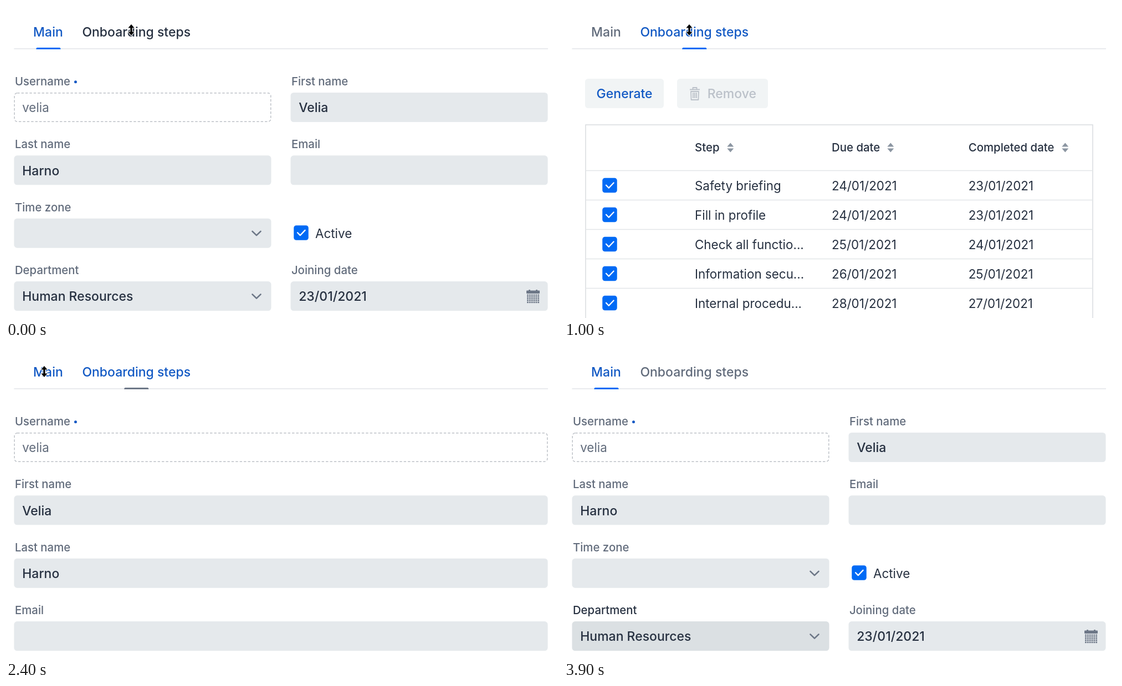
Animation of 996x562 px, one loop 4 s. Source, as an HTML page:

```html
<!DOCTYPE html>
<html lang="en">
<head>
<meta charset="utf-8">
<title>Onboarding form</title>
<style>
  :root {
    --blue: #006af5; --link: #1259c4; --ink: #263040; --muted: #616b7b;
    --icon: #6d7787; --field: #e5e9ec; --shade: #dbe0e3; --off: #bbc1c9;
  }
  html, body { margin: 0; width: 100%; height: 100%; overflow: hidden; background: #fff; }
  svg { display: block; width: 996px; height: 562px; }
  text { font-family: Inter, Roboto, sans-serif; font-size: 22.4px; fill: var(--ink); white-space: pre; }
  .medium { font-size: 23px; font-weight: 500; }
  .label { font-size: 20.4px; font-weight: 500; fill: var(--muted); }
  .head { font-size: 20.4px; font-weight: 500; }
  .readonly { fill: var(--muted); }
  .link { fill: var(--link); }
  .off { fill: var(--off); }
  .box { fill: var(--field); }
  .dashed { fill: #fff; stroke: #bdc1c7; stroke-width: 1.5; stroke-dasharray: 4.4 3; }
  .button { fill: #f1f4f5; }
  .line { fill: none; stroke: #e2e5e8; stroke-width: 1.5; }
  .bar, .halo { fill: var(--blue); transform-box: fill-box; transform-origin: center; }

  /* One frame is 2.5% of the loop; the small lead keeps samples off the edges. */
  .anim { animation: 4s step-end -10ms infinite; }
  #two { animation-name: two; }
  #grid { animation-name: grid; }
  #one { animation-name: one; }
  #mainTab { animation-name: main-tab; }
  #stepsTab { animation-name: steps-tab; }
  #mainBar { animation-name: main-bar; }
  #stepsBar { animation-name: steps-bar; }
  #mainHalo { animation-name: main-halo; }
  #stepsHalo { animation-name: steps-halo; }
  #firstClick { animation-name: first-click; }
  #secondClick { animation-name: second-click; }
  #cursor { animation-name: cursor; }
  .hover .box { animation: hover-box 4s step-end var(--at) infinite; }
  .hover .label { animation: hover-label 4s step-end var(--at) infinite; }

  @keyframes two { 0%, 62.5% { visibility: visible } 7.5% { visibility: hidden } }
  @keyframes grid { 0%, 60% { visibility: hidden } 7.5% { visibility: visible } }
  @keyframes one { 0%, 62.5% { visibility: hidden } 60% { visibility: visible } }
  @keyframes main-tab {
    0%, 57.5% { fill: var(--link) } 10% { fill: var(--muted) } 42.5% { fill: var(--ink) }
  }
  @keyframes steps-tab {
    0% { fill: var(--ink) } 5% { fill: var(--link) } 62.5%, 100% { fill: var(--muted) }
  }
  @keyframes main-bar {
    0%, 62.5%, 100% { fill: var(--blue); transform: none }
    7.5% { fill: var(--icon); transform: none }
    10% { fill: var(--icon); transform: scaleX(.15) }
    12.5% { fill: var(--icon); transform: scaleX(0) }
  }
  @keyframes steps-bar {
    0%, 65%, 100% { fill: var(--icon); transform: scaleX(0) }
    10% { fill: var(--blue); transform: scaleX(1.1) }
    12.5% { fill: var(--blue); transform: none }
    60% { fill: var(--icon); transform: none }
    62.5% { fill: var(--icon); transform: scaleX(.15) }
  }
  @keyframes steps-halo { 0%, 15%, 100% { opacity: 0 } 10% { opacity: .15 } 12.5% { opacity: .05 } }
  @keyframes main-halo { 0%, 67.5%, 100% { opacity: 0 } 62.5% { opacity: .15 } 65% { opacity: .05 } }
  @keyframes first-click { 0%, 7.5%, 100% { opacity: 0 } 2.5% { opacity: 1 } }
  @keyframes second-click { 0%, 60%, 100% { opacity: 0 } 55% { opacity: 1 } }
  @keyframes hover-box { 0% { fill: var(--shade) } 2.5%, 100% { fill: var(--field) } }
  @keyframes hover-label { 0% { fill: var(--ink) } 2.5%, 100% { fill: var(--muted) } }
  @keyframes cursor {
    0% { transform: translate(226px, 43px); opacity: 1 }
    32.5% { transform: translate(222px, 44px) }
    35% { transform: translate(204px, 45px) }
    37.5% { transform: translate(170px, 46px) }
    40% { transform: translate(132px, 47px) }
    42.5% { transform: translate(96px, 47px) }
    45% { transform: translate(74px, 46px) }
    47.5% { transform: translate(69px, 46px) }
    85% { transform: translate(121px, 106px) }
    87.5% { transform: translate(160px, 205px) }
    90% { transform: translate(195px, 315px) }
    92.5% { transform: translate(225px, 430px) }
    95% { transform: translate(250px, 549px); opacity: 1 }
    97.5%, 100% { transform: translate(250px, 580px); opacity: 0 }
  }
</style>
</head>
<body>
<svg id="stage" viewBox="0 0 996 562"></svg>
<script>
  const LEFT = 14.5, RIGHT = 513.5, HALF = 464, FULL = 963, STEP = 113.35;

  const text = (x, y, str, cls = '', extra = '') =>
    `<text x="${x}" y="${y}" class="${cls}" ${extra}>${str}</text>`;
  const rect = (x, y, w, h, r, attrs) =>
    `<rect x="${x}" y="${y}" width="${w}" height="${h}" rx="${r}" ${attrs}/>`;
  const path = (d, attrs) => `<path d="${d}" ${attrs}/>`;
  const range = (n, make) => Array.from({ length: n }, (_, i) => make(i)).join('');
  const layer = (id, body) => `<g id="${id}" class="anim">${body}</g>`;

  const check = (x, y) =>
    rect(x + .25, y + .25, 26.5, 26.5, 4.5, 'fill="var(--blue)"') +
    path(`M${x + 7} ${y + 13.2}l4.8 4.9 8.8-9.2`,
      'fill="none" stroke="#fff" stroke-width="2.3" stroke-linecap="round" stroke-linejoin="round"');

  const chevron = y => path(`M444.5 ${y - 3.6}l7.5 7.2 7.5-7.2`,
    'fill="none" stroke="var(--icon)" stroke-width="2.7" stroke-linecap="round" stroke-linejoin="round"');

  const calendar = (x, y) => `<g fill="var(--icon)">` +
    rect(x, y + 1.5, 24, 5.5, 1, '') + rect(x + 4, y, 3, 4, 1, '') + rect(x + 17, y, 3, 4, 1, '') +
    range(30, i => rect(x + 1 + (i % 6) * 3.85, y + 8.6 + Math.floor(i / 6) * 3.3, 2.8, 2.3, 0, '')) + `</g>`;

  const trash = (x, y) => path(
    `M${x} ${y + 4.5}h18M${x + 5.5} ${y + 4}v-3h7v3M${x + 2} ${y + 8}h14l-.6 15h-12.8z` +
    `M${x + 6} ${y + 10}v10M${x + 9} ${y + 10}v10M${x + 12} ${y + 10}v10`,
    'fill="none" stroke="var(--off)" stroke-width="1.8" stroke-linejoin="round"');

  const sorter = x => path(`M${x - 6} 253.5l6-7 6 7zM${x - 6} 256.5l6 7 6-7z`, 'fill="#8c96a2"');

  // A labelled input; hoverAt is the animation delay of its highlight.
  function field(x, row, w, label, value = '', { readonly = false, hoverAt = '' } = {}) {
    const top = 156 + row * STEP;
    const box = readonly
      ? rect(x + .75, top + .75, w - 1.5, 51.5, 5, 'class="dashed"')
      : rect(x, top, w, 53, 5.5, 'class="box"');
    const dot = readonly ? '<circle cx="125.5" cy="136.7" r="2.5" fill="var(--link)"/>' : '';
    return `<g ${hoverAt && `class="hover" style="--at:${hoverAt}"`}>` + box +
      text(x + 1.4, top - 13, label, 'label') + dot +
      text(x + 14.7, top + 35.3, value, readonly ? 'readonly' : 'medium') + `</g>`;
  }

  const user = { login: 'velia', first: 'Velia', last: 'Harno' };

  const twoColumns =
    field(LEFT, 0, HALF, 'Username', user.login, { readonly: true }) +
    field(RIGHT, 0, HALF, 'First name', user.first) +
    field(LEFT, 1, HALF, 'Last name', user.last, { hoverAt: '-310ms' }) +
    field(RIGHT, 1, HALF, 'Email') +
    field(LEFT, 2, HALF, 'Time zone', '', { hoverAt: '-210ms' }) + chevron(409.5) +
    check(519, 395) + text(558, 418, 'Active') +
    field(LEFT, 3, HALF, 'Department', 'Human Resources', { hoverAt: '-110ms' }) + chevron(523) +
    field(RIGHT, 3, HALF, 'Joining date', '23/01/2021') + calendar(939, 511);

  const oneColumn =
    field(LEFT, 0, FULL, 'Username', user.login, { readonly: true }) +
    field(LEFT, 1, FULL, 'First name', user.first) +
    field(LEFT, 2, FULL, 'Last name', user.last) +
    field(LEFT, 3, FULL, 'Email');

  const tasks = [
    ['Safety briefing', 24, 23],
    ['Fill in profile', 24, 23],
    ['Check all functio...', 25, 24],
    ['Information secu...', 26, 25],
    ['Internal procedu...', 28, 27],
  ];
  const columns = [['Step', 236, 300.3], ['Due date', 483, 589.3], ['Completed date', 729.7, 904.3]];

  const table =
    rect(38, 131, 142, 53, 5.5, 'class="button"') + text(58.6, 166.2, 'Generate', 'medium link') +
    rect(204, 131, 164, 53, 5.5, 'class="button"') + trash(227, 146) +
    text(258.7, 166.2, 'Remove', 'medium off') +
    rect(39, 214, 915, 400, 0, 'class="line" style="stroke:#d9dce0"') +
    columns.map(([name, x, icon]) => text(x, 262, name, 'head') + sorter(icon)).join('') +
    tasks.map(([name, due, done], i) => {
      const y = 296.4 + 53 * i;
      return path(`M39 ${y}H954`, 'class="line"') + check(69, y + 13.2) +
        text(236, y + 35.4, name) +
        text(483, y + 35.4, `${due}/01/2021`) +
        text(729.7, y + 35.4, `${done}/01/2021`);
    }).join('');

  const bar = (id, cx) =>
    rect(cx - 26, 70, 52, 7.5, 4, `id="${id}Halo" class="halo anim"`) +
    path(`M${cx - 22} 78v-1q0-2 2-2h40q2 0 2 2v1z`, `id="${id}Bar" class="bar anim"`);

  const tabs =
    path('M14.5 77H978', 'class="line"') +
    bar('main', 76.5) + bar('steps', 235.3) +
    text(49.1, 54.6, 'Main', 'medium anim', 'id="mainTab"') +
    text(137.4, 54.6, 'Onboarding steps', 'medium anim', 'id="stepsTab"');

  const ring = (id, x, y) =>
    `<circle id="${id}" class="anim" cx="${x}" cy="${y}" r="24.5" fill="none" stroke="#000" stroke-width="2"/>`;

  const pointer = path('M0-10l5.6 6.6h-4v6.8h4l-5.6 6.6-5.6-6.6h4v-6.8h-4z',
    'id="cursor" class="anim" stroke="#fff" stroke-width="2" paint-order="stroke" stroke-linejoin="round"');

  document.getElementById('stage').innerHTML =
    layer('two', twoColumns) + layer('one', oneColumn) + layer('grid', table) +
    tabs + ring('firstClick', 226, 43) + ring('secondClick', 69, 46) + pointer;
</script>
</body>
</html>
```
